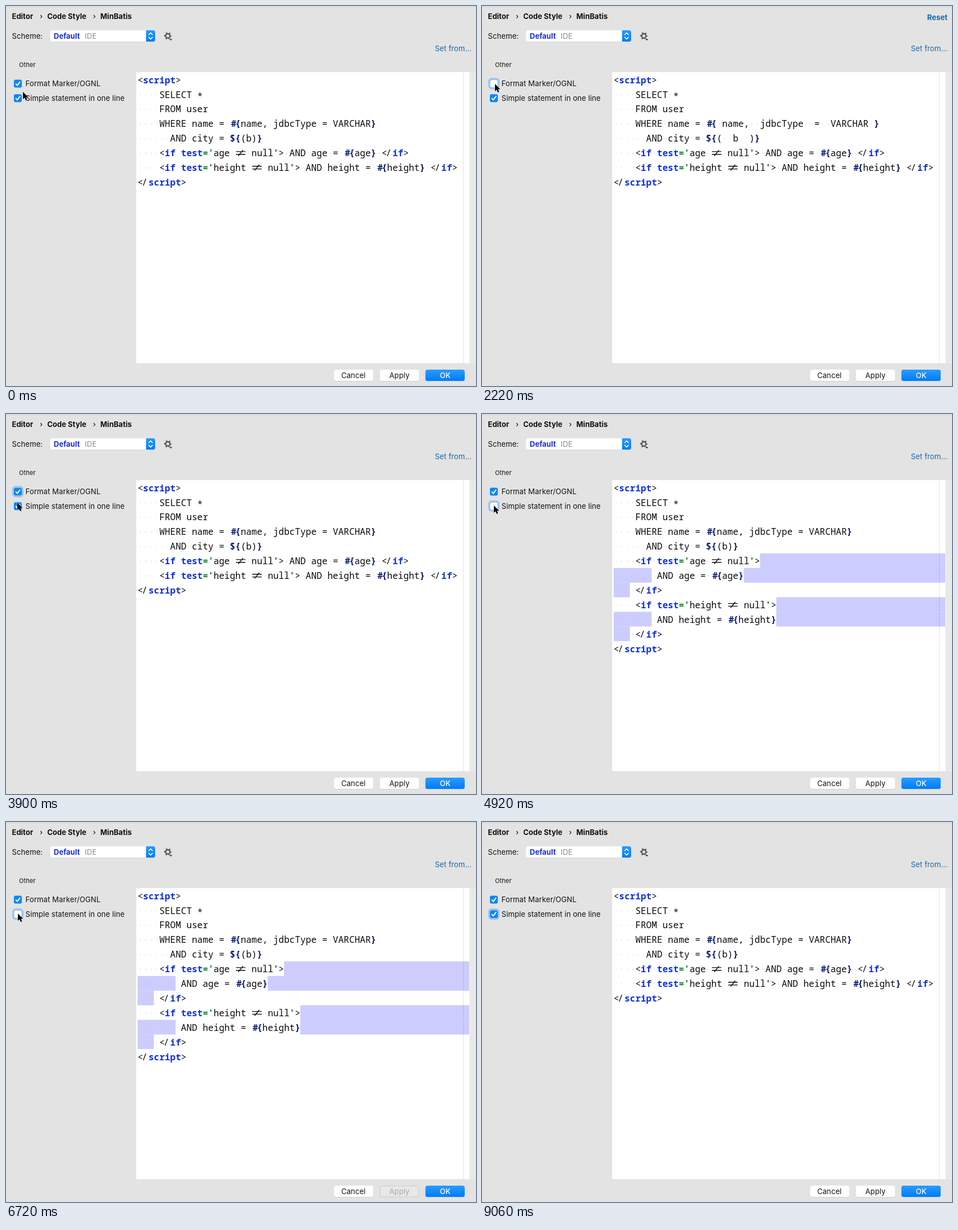
An HTML page that plays this animation: 832 by 673 pixels, repeating every 9.3 s.

```html
<!DOCTYPE html>
<html lang="en">
<head>
<meta charset="utf-8">
<title>Code Style</title>
<style>
  html, body { margin: 0; width: 100%; height: 100%; overflow: hidden; background: #e3e3e3; }
  svg { display: block; width: 832px; height: 673px; }
  .ui { font: 13px Inter, sans-serif; letter-spacing: .1px; fill: #111; white-space: pre; }
  .bold { font-weight: 700; letter-spacing: 0; }
  .link { fill: #1668ad; }
  .mid { text-anchor: middle; }
  .code { font: 16px "Noto Sans Mono", "DejaVu Sans Mono", monospace; fill: #0a0a0a; white-space: pre; font-variant-ligatures: none; }
  .code .tag { fill: #1130e2; font-weight: 700; }
  .code .str { fill: #077d1c; font-weight: 700; }
  .code .par { fill: #0b1a78; font-weight: 700; }
  .code .dot { fill: #cfcfcf; }
  .code .sel { fill: #ccccfe; }
</style>
</head>
<body>
<svg viewBox="0 0 832 673" xmlns="http://www.w3.org/2000/svg">
  <defs>
    <linearGradient id="blue" x2="0" y2="1">
      <stop stop-color="#2a9cff"/><stop offset="1" stop-color="#007bfb"/>
    </linearGradient>
    <g id="box">
      <rect width="14" height="14" rx="3" fill="#0c86f8"/>
      <path d="M3.6 7.4 6 10.2 10.6 3.9" fill="none" stroke="#fff" stroke-width="1.9" stroke-linecap="round" stroke-linejoin="round"/>
    </g>
    <rect id="empty" x=".25" y=".25" width="13.5" height="13.5" rx="3" fill="#fff" stroke="#c2c6cc" stroke-width=".5"/>
    <rect id="ring" x="-1.4" y="-1.4" width="16.8" height="16.8" rx="4.2" fill="none" stroke="#9cc3ef" stroke-width="3"/>
    <g id="btn">
      <rect y=".8" width="69" height="20" rx="3.5" fill="#c9c9c9"/>
      <rect width="69" height="20" rx="3.5" fill="#fff"/>
    </g>
  </defs>

  <rect width="832" height="673" fill="#e3e3e3"/>
  <rect y="1" width="832" height="1" fill="#d3d3d3"/>

  <g class="ui">
    <g class="bold">
      <text x="10.5" y="23">Editor</text>
      <text x="73" y="23">Code Style</text>
      <text x="167" y="23">MinBatis</text>
    </g>
    <path d="M61 16l2.6 2.8-2.6 2.8M155 16l2.6 2.8-2.6 2.8" fill="none" stroke="#222" stroke-width="1.2"/>
    <text x="10.5" y="58">Scheme:</text>
    <rect x="78" y="43.6" width="186" height="20" rx="3.5" fill="#cdcdcd"/>
    <rect x="78" y="43" width="186" height="20" rx="3.5" fill="#fff"/>
    <path d="M248 43h12.5a3.5 3.5 0 0 1 3.5 3.5v13a3.5 3.5 0 0 1-3.5 3.5H248z" fill="url(#blue)"/>
    <path d="M252.8 50.8l3.2-3.2 3.2 3.2M252.8 55.4l3.2 3.2 3.2-3.2" fill="none" stroke="#fff" stroke-width="1.5" stroke-linecap="round" stroke-linejoin="round"/>
    <text x="84.5" y="58" class="bold" style="fill:#1a2fe0">Default</text>
    <text x="139.5" y="58" style="fill:#8a8a8a">IDE</text>
    <g transform="translate(286.5 53)" fill="none" stroke="#606060">
      <circle r="3.7" stroke-width="2.4"/>
      <circle r="5.4" stroke-width="2.4" stroke-dasharray="2.8 2.855" stroke-dashoffset="1.4"/>
    </g>
    <path d="M288.6 58h6.2l-3.1 3.6z" fill="#333" stroke="#e3e3e3" stroke-width=".6"/>
    <text x="824" y="80" class="link" text-anchor="end">Set from...</text>
    <text id="reset" x="824" y="25" class="link bold" text-anchor="end">Reset</text>
    <text x="23" y="107.5" style="font-size:11px">Other</text>
    <text x="34.5" y="142.3">Format Marker/OGNL</text>
    <text x="34.5" y="168.3">Simple statement in one line</text>
  </g>

  <g transform="translate(14 130.5)">
    <use href="#box"/><use id="off1" href="#empty"/><use id="ring1" href="#ring"/>
  </g>
  <g transform="translate(14 156.2)">
    <use href="#box"/><use id="off2" href="#empty"/><use id="ring2" href="#ring"/>
  </g>

  <rect x="820" y="117" width="12" height="515.5" fill="#e9e9e9"/>
  <rect x="230.5" y="117" width="590" height="515.5" fill="#fff"/>
  <g id="editor" class="code"></g>
  <rect x="809" y="117" width="1" height="515.5" fill="#000" opacity=".1"/>

  <g class="ui mid">
    <use href="#btn" x="581" y="644"/><text x="615" y="659">Cancel</text>
    <use href="#btn" x="662" y="644"/><text x="696.5" y="659">Apply</text>
    <g id="dim">
      <rect x="661" y="643" width="71" height="23" fill="#e3e3e3"/>
      <rect x="662.5" y="644.5" width="68" height="19.5" rx="3.5" fill="#e8e8e8" stroke="#cacaca"/>
      <text x="696.5" y="659" style="fill:#a9a9a9">Apply</text>
    </g>
    <rect x="742.5" y="644.6" width="69.5" height="20" rx="3.5" fill="#bccbdc"/>
    <rect x="742.5" y="644" width="69.5" height="20" rx="3.5" fill="url(#blue)"/>
    <text x="777.5" y="659" style="fill:#fff;font-weight:500">OK</text>
  </g>

  <g id="cursor">
    <path d="M0 0V13L3 10.3 5.1 15 7.4 14 5.4 9.5H9.5Z" fill="#000" stroke="#fff" stroke-width=".9" paint-order="stroke"/>
  </g>
</svg>
<script>
const LOOP = 9300, LEFT = 233, PITCH = 9.6, TOP = 118, ROW = 25.9, EDGE = 820;
const byId = id => document.getElementById(id);
const editor = byId('editor');
const colX = c => LEFT + c * PITCH;

function add(parent, name, attrs, text) {
  const el = document.createElementNS('http://www.w3.org/2000/svg', name);
  for (const k in attrs) el.setAttribute(k, attrs[k]);
  if (text) el.textContent = text;
  parent.append(el);
  return el;
}

const layer = () => add(editor, 'g', {});

// Tokens sit on a fixed character grid; joined glyph pairs are composed here.
const TOKEN = /<\/|!=|#\{|\$\{|='|\w+|\S| /g;
function tokenClass(s) {
  if (/^(script|if|test)$/.test(s)) return 'tag';
  if (/'/.test(s)) return 'str';
  if (/[{}]/.test(s)) return 'par';
  return '';
}
function line(parent, row, src) {
  const y = TOP + 18.6 + row * ROW;
  for (const m of src.matchAll(TOKEN)) {
    const s = m[0], x = colX(m.index), cls = tokenClass(s);
    const put = (str, dx = 0, dy = 0) => add(parent, 'text', { x: x + dx, y: y + dy, class: cls }, str);
    if (s === ' ') add(parent, 'circle', { cx: x + 4.8, cy: y - 5.2, r: 0.8, class: 'dot' });
    else if (s === '!=') add(parent, 'path', {
      d: `M${x + 1.2} ${y - 8.2}h16.8m0 4.8h-16.8M${x + 5.4} ${y - .6}l8.4-10.4`,
      fill: 'none', stroke: '#0a0a0a', 'stroke-width': 1.4 });
    else if (s === '</') { put('<'); put('/', 7.6); }
    else if (s === '#{') { put('#', 2); put('{', PITCH); }
    else put(s, 0, s === '*' ? 3 : 0);
  }
}

// Each span is [row, first column, last column]; no end means the editor edge.
function spans(list) {
  const g = layer();
  for (const [row, a, b] of list) {
    const x = colX(a), end = b === undefined ? EDGE : colX(b);
    add(g, 'rect', { x, y: TOP - .7 + row * ROW, width: end - x, height: ROW + .1, class: 'sel' });
  }
  return g;
}
// Zero-width spans show as slim bars.
const bars = list => spans(list.map(([r, c]) => [r, c - .1, c + .12]));

function block(start, rows) {
  const g = layer();
  rows.forEach((src, i) => line(g, start + i, src));
  return g;
}

// Visible only inside the given [from, to] times.
function show(el, ...times) {
  const keys = [{ offset: 0, opacity: 0 }];
  for (const [a, b] of times) {
    if (a === 0) keys[0].opacity = 1;
    else keys.push({ offset: a / LOOP, opacity: 1 });
    if (b < LOOP) keys.push({ offset: b / LOOP, opacity: 0 });
  }
  keys.push({ offset: 1, opacity: keys[keys.length - 1].opacity });
  keys.forEach(k => k.easing = 'step-end');
  el.animate(keys, { duration: LOOP, iterations: Infinity });
}

// Preview update times
const SPACED = 900, TIGHT = 3480, SPLIT = 4920, JOINED = 7680;
const CLOSE = '<\/script>';

const spacedSel = spans([[3, 19, 20], [3, 25, 26], [3, 35, 36], [3, 38, 39], [3, 47, 48], [4, 20, 22], [4, 23, 25]]);
const tightSel = bars([[3, 19], [3, 25], [3, 33], [3, 36], [3, 43], [4, 20], [4, 21]]);
const splitSel = spans([[5, 27], [6, 0, 7], [6, 24], [7, 0, 3], [8, 30], [9, 0, 7], [9, 30], [10, 0, 3]]);
const joinedSel = bars([[5, 28], [5, 45], [6, 31], [6, 54]]);

block(0, ['<script>', '    SELECT *', '    FROM user']);
const tight = block(3, ['    WHERE name = #{name, jdbcType = VARCHAR}', '      AND city = ${(b)}']);
const spaced = block(3, ['    WHERE name = #{ name,  jdbcType  =  VARCHAR }', '      AND city = ${(  b  )}']);
const joined = block(5, [
  "    <if test='age != null'> AND age = #{age} </if>",
  "    <if test='height != null'> AND height = #{height} </if>",
  CLOSE]);
const split = block(5, ['age', 'height'].flatMap(f => [
  `    <if test='${f} != null'>`, `        AND ${f} = #{${f}}`, '    </if>']).concat(CLOSE));

show(tight, [0, SPACED], [TIGHT, LOOP]);
show(spaced, [SPACED, TIGHT]);
show(joined, [0, SPLIT], [JOINED, LOOP]);
show(split, [SPLIT, JOINED]);

show(spacedSel, [SPACED, 1320], [1740, 2220], [2640, 3060]);
show(tightSel, [TIGHT, 3900], [4380, 4680]);
show(splitSel, [SPLIT, 5340], [5820, 6300], [6720, 7200]);
show(joinedSel, [JOINED, 8100], [8580, 9060]);

show(byId('off1'), [480, 3360]);
show(byId('ring1'), [480, 4560]);
show(byId('off2'), [4560, 7500]);
show(byId('ring2'), [4560, LOOP]);
show(byId('reset'), [1380, 3900]);
show(byId('dim'), [5400, 8280]);

// Pointer path: [time, x, y]
const path = [
  [0, 30, 152], [60, 30, 152], [420, 23, 138], [3480, 23, 138], [3900, 20, 157], [4080, 21, 162],
  [8280, 21, 162], [8340, 23, 174], [8400, 72, 329], [8460, 94, 425], [8520, 93, 492],
  [8580, 94, 535], [8640, 96, 597], [8700, 94, 631], [8760, 94, 700], [LOOP, 94, 700]];
byId('cursor').animate(
  path.map(([t, x, y]) => ({ offset: t / LOOP, transform: `translate(${x}px, ${y}px)` })),
  { duration: LOOP, iterations: Infinity });
</script>
</body>
</html>
```
